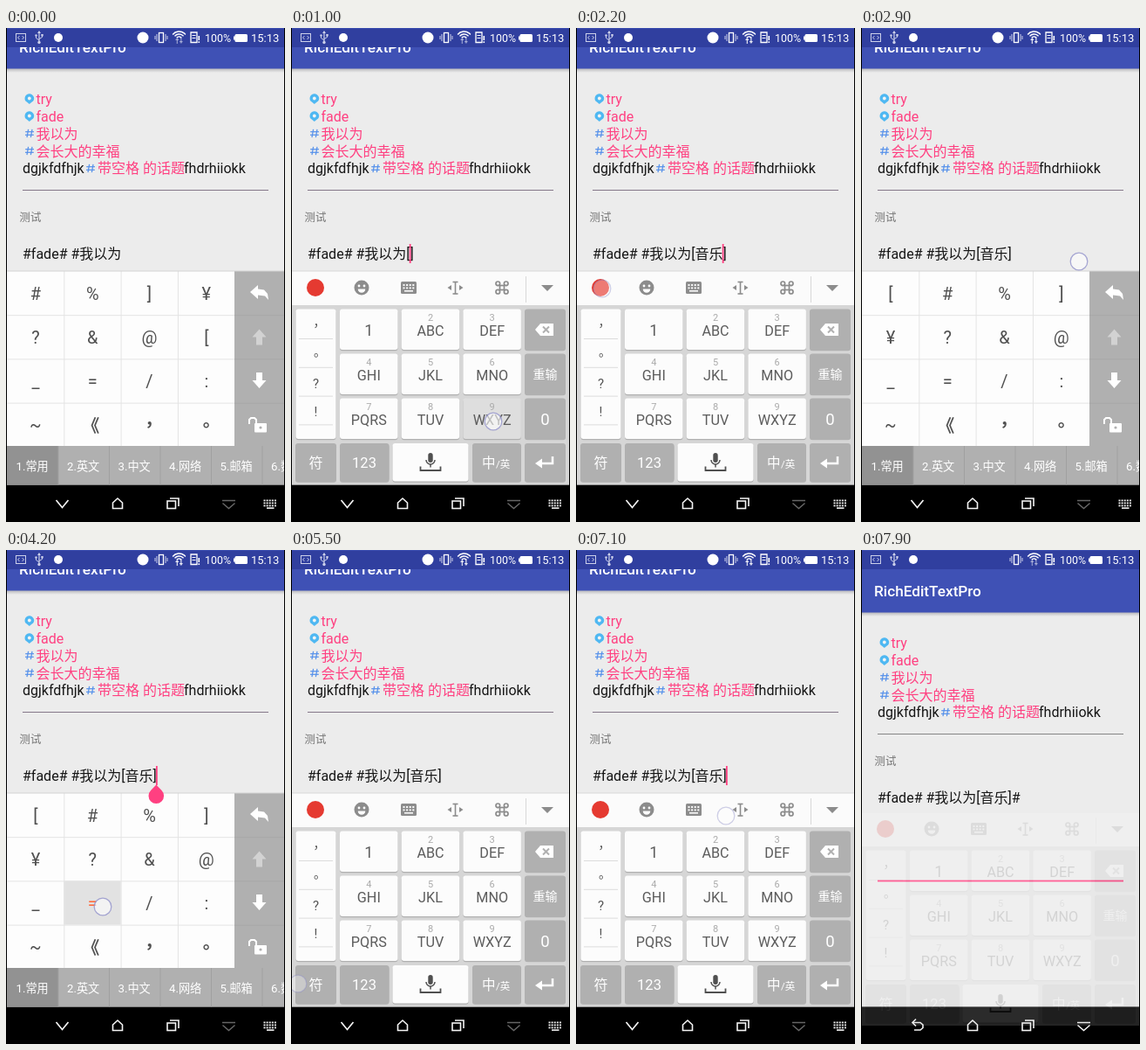
An HTML page with a canvas for the animation above (8000 ms loop, 320 by 565 pixels).

```html
<!DOCTYPE html>
<html lang="zh-CN">
<head>
<meta charset="utf-8">
<title>RichEditTextPro</title>
<style>
html, body { margin: 0; width: 320px; height: 565px; overflow: hidden; background: #000; }
canvas { display: block; width: 320px; height: 565px; }
</style>
</head>
<body>
<canvas id="stage"></canvas>
<script>
const LOOP = 8000, STEP = 100, BASE = 522.4;
const FONT = "Roboto, 'Noto Sans CJK SC', 'Noto Sans CJK', sans-serif";
const PINK = '#ff4081', GREY = '#b0b0b0', DIM = '#8c8c8c';
const canvas = document.getElementById('stage');
const c = canvas.getContext('2d');
const ratio = window.devicePixelRatio || 1;
canvas.width = 320 * ratio;
canvas.height = 565 * ratio;

// Timelines: [start, value]
const BOARD = [[0, 'sym'], [600, 'keys'], [2500, 'sym'], [4300, 'keys'], [5600, 'sym'], [7100, 'keys']];
const ORDER = [[0, '#%]¥?&@[_=/:~《，。'], [600, '[#%]¥?&@_=/:~《，。'], [4300, '=[#%]¥?&@_/:~《，。']];
const HEAD = '#fade# #我以为';
const EDIT = [[0, HEAD + '|'], [700, HEAD + '[|]'], [2200, HEAD + '[音乐|]'], [3000, HEAD + '[音乐]|'],
  [4400, HEAD + '[音乐]=|'], [5100, HEAD + '[音乐]|'], [7200, HEAD + '[音乐]#|']];
const CARET = [[0, 0], [700, 1], [2600, 0], [3000, 1], [3500, 0], [4000, 1], [4800, 0], [5000, 1],
  [5400, 0], [6000, 1], [6500, 0], [7000, 1], [7600, 0]];
const WIFI = [[0, .45], [300, .8], [600, .45], [1300, .8], [6300, .45], [6500, .8], [7200, .45]];
const IDLE = { pin: '', list: ['，', '。', '?', '!'], cand: null };
const INPUT = [[0, IDLE],
  [1100, { pin: 'w', list: ['w', 'x', 'y', 'z'], cand: ['我', '在', '一', '想', '有', '要', '这'] }],
  [1300, { pin: 'xi', list: ['xi', 'yi', 'zi', 'wg'], cand: ['一', '系', '以', '西', '已', '字', '洗'] }],
  [1500, { pin: 'xin', list: ['xin', 'yin', 'xi', 'yi'], cand: ['心', '♥', '新', '信', '因', '银', '音'] }],
  [1700, { pin: 'yin y', list: ['yin', 'xin', 'yi', 'xi'], cand: ['音乐', '信用', '新月', '音域'] }],
  [2200, IDLE]];
// x, y, start, end, pressed key
const TOUCH = [[232, 354, 500, 700, '['], [232, 450, 1000, 1200, 'WXYZ'], [91, 398, 1200, 1400, 'GHI'],
  [231, 399, 1400, 1600, 'MNO'], [236, 453, 1600, 1800, 'WXYZ'], [30, 298, 2100, 2300, ''],
  [28, 497, 2400, 2700, '符'], [250, 267, 2900, 3200, ''], [111, 408, 4200, 4500, '='],
  [291, 345, 5000, 5200, 'del'], [8, 496, 5400, 5700, ''], [172, 304, 7000, 7300, '#']];

const at = (line, t) => line.reduce((v, [s, x]) => t >= s ? x : v, line[0][1]);

function rect(x, y, w, h, fill) { c.fillStyle = fill; c.fillRect(x, y, w, h); }

function round(x, y, w, h, r, fill) {
  c.fillStyle = fill;
  c.beginPath(); c.roundRect(x, y, w, h, r); c.fill();
}

function disc(x, y, r, fill) {
  c.fillStyle = fill;
  c.beginPath(); c.arc(x, y, r, 0, 7); c.fill();
}

// Points as flat x, y pairs
function trace(pts) {
  c.beginPath();
  for (let i = 0; i < pts.length; i += 2) c.lineTo(pts[i], pts[i + 1]);
}

function line(pts, color, w = 1, close) {
  trace(pts);
  if (close) c.closePath();
  c.strokeStyle = color; c.lineWidth = w; c.stroke();
}

function poly(pts, fill) { trace(pts); c.fillStyle = fill; c.fill(); }

function box(x, y, w, h, color, lw = 1) {
  c.strokeStyle = color; c.lineWidth = lw; c.strokeRect(x, y, w, h);
}

function text(s, x, y, size, color, align = 'left', weight = 400) {
  c.font = `${weight} ${size}px ${FONT}`;
  c.textAlign = align; c.fillStyle = color;
  c.fillText(s, x, y);
}

// Centres the ink of a glyph
function ink(s, x, y, size, color, weight) {
  c.font = `${weight} ${size}px ${FONT}`;
  c.textAlign = 'left';
  const m = c.measureText(s);
  text(s, x - (m.actualBoundingBoxRight - m.actualBoundingBoxLeft) / 2,
    y + (m.actualBoundingBoxAscent - m.actualBoundingBoxDescent) / 2, size, color, 'left', weight);
}

function glyph(s, x, y, size, color) {
  if ('，。《'.includes(s)) ink(s, x + (s === '《' ? 3 : 0), y, size, color, 700);
  else text(s, x, y + size * .36, size, color, 'center');
}

function shift(x, y, draw) { c.save(); c.translate(x, y); draw(); c.restore(); }

function pin(x, y) {
  c.fillStyle = '#4fb8f2';
  c.beginPath();
  c.arc(x, y - .5, 5.3, Math.PI * .8, Math.PI * .2);
  c.lineTo(x, y + 6); c.fill();
  disc(x, y - .5, 1.9, '#f4f4f4');
}

function hash(x, y) {
  shift(x, y, () => {
    const b = '#5590ea';
    line([-1.4, -4.7, -3, 4.7], b, 1.2); line([3, -4.7, 1.4, 4.7], b, 1.2);
    line([-4.8, -1.8, 5, -1.8], b, 1.2); line([-5, 1.8, 4.8, 1.8], b, 1.2);
  });
}

function statusBar(t) {
  const w = '#fff', soft = '#ccd0ea';
  rect(1, .7, 318, 21.3, '#303f9f');
  box(11.5, 6.5, 11, 9, soft);
  line([15.5, 9, 13.5, 11, 15.5, 13], soft); line([18.5, 9, 20.5, 11, 18.5, 13], soft);
  line([38, 4, 38, 17], soft, 1.2); poly([36, 6, 38, 3, 40, 6], soft);
  line([38, 14, 34.5, 11.5, 34.5, 8.5], soft); line([38, 12.5, 41.5, 10.5, 41.5, 8], soft);
  disc(38, 16.5, 1.7, soft); disc(34.5, 8.5, 1.2, soft); rect(40.3, 7, 2.4, 2.4, soft);
  disc(60, 11, 5, w);
  if (t < 7600) disc(157, 11, 6.5, w);
  box(175.5, 5.5, 5, 11, w, 1.3);
  line([173, 7, 173, 15], soft); line([183, 7, 183, 15], soft);
  line([171, 9, 171, 13], soft); line([185, 9, 185, 13], soft);
  c.lineWidth = 1.5; c.strokeStyle = w;
  for (const r of [3.5, 6.5, 9.5]) { c.beginPath(); c.arc(198.5, 13.5, r, -2.45, -.69); c.stroke(); }
  c.globalAlpha = at(WIFI, t);
  poly([194, 14, 196.3, 11, 198.6, 14], w); rect(195.7, 13, 1.3, 5, w);
  poly([198.6, 15, 200.9, 18, 203, 15], w); rect(200.2, 11, 1.3, 5, w);
  c.globalAlpha = 1;
  line([212, 5, 219, 5, 219, 16.5, 212, 16.5], w, 1.3, true);
  rect(213.5, 8, 4, 1, w); rect(213.5, 11, 4, 1, w);
  rect(220.5, 9, 1.6, 5, w); rect(220.5, 15.3, 1.6, 1.7, w);
  text('100%', 228, 15.7, 12.4, w);
  round(262.5, 7, 14.5, 9, 1.5, w); rect(261, 9.5, 2, 4, w);
  text('15:13', 281, 16, 13, w);
}

function page(t) {
  const open = t >= 7600, dy = open ? 25 : 0;
  rect(1, 0, 318, BASE, '#ececec');
  shift(0, dy, () => {
    const shade = c.createLinearGradient(0, 46, 0, 51);
    shade.addColorStop(0, '#b4b4b8'); shade.addColorStop(1, '#ececec');
    rect(1, 46, 318, 5, shade);
    rect(1, -25, 318, 71.5, '#3f51b5');
    text('RichEditTextPro', 15, 28, 17.2, '#fff', 'left', 500);
    pin(26.8, 81); pin(26.8, 101); hash(27, 120.5); hash(27, 140.5);
    ['try', 'fade', '我以为', '会长大的幸福'].forEach((s, i) => text(s, 34.4, 86.5 + 20 * i, 16, PINK));
    text('dgjkfdfhjk', 19, 165.5, 16, '#161616');
    hash(97, 160.5);
    text('带空格 的话题', 105, 165.5, 16, PINK);
    text('fhdrhiiokk', 204, 165.5, 16, '#161616');
    rect(19, 185, 282, 1, open ? '#858585' : '#857789');
    text('测试', 15.5, 220.5, 12.4, '#757575');
    if (open) rect(19, 352.6, 282, 1.8, PINK);
    const [a, b] = at(EDIT, t).split('|');
    text(a + b, 19, 264, 16, '#161616');
    if (at(CARET, t)) rect(18.2 + c.measureText(a).width, 247, 1.8, 22, PINK);
  });
}

function symbols(t, down) {
  rect(1, 278, 262, 200, '#fdfdfd');
  rect(262, 278, 57, 200, GREY);
  [...at(ORDER, t)].forEach((s, i) => {
    const x = 1 + (i % 4) * 65.3, y = 278 + (i >> 2) * 50.2, hot = s === down;
    if (hot) rect(x, y, 65.3, 50.2, '#e2e2e2');
    glyph(s, x + 32.9, y + 25.4, 20, hot ? '#ff6a3c' : '#505050');
  });
  for (let i = 1; i < 4; i++) {
    rect(1 + i * 65.3, 278, 1, 200, '#e4e4e4');
    rect(1, 278 + i * 50.2, 261, 1, '#e4e4e4');
    rect(262, 278 + i * 50.2, 57, 1, '#a8a8a8');
  }
  rect(1, 277.5, 318, 1, '#d4d4d4');
  poly([280, 302, 289, 294, 289, 298.5, 296, 299.5, 300, 304, 301, 311, 297, 306.5, 289, 305.5, 289, 310], '#fff');
  const up = [-8, 0, 0, -9, 8, 0, 3.5, 0, 3.5, 9, -3.5, 9, -3.5, 0];
  shift(290.5, 353.5, () => poly(up, '#d2d2d2'));
  shift(290.5, 403, () => { c.scale(1, -1); poly(up, '#fff'); });
  round(285, 452, 14, 10.5, 1, '#fff');
  disc(292, 457, 1.6, GREY);
  line([287, 453, 287, 448, 285, 446, 281, 446, 279, 448, 279, 453], '#fff', 2);
  rect(1, 478, 318, BASE - 478, GREY);
  rect(1, 478, 59, BASE - 478, '#929292');
  ['常用', '英文', '中文', '网络', '邮箱', '数学'].forEach((s, i) => {
    const x = 1 + i * 58.5;
    if (i) rect(x, 478, 1, BASE - 478, '#a0a0a0');
    text(`${i + 1}.${s}`, x + 10.5, 505.5, 13.2, '#fff');
  });
}

function tools() {
  const g = DIM, paper = '#fbfbfb';
  disc(28, 297, 10, '#e53a31');
  disc(81, 297, 8.5, g);
  disc(78, 295, 1.4, paper); disc(84, 295, 1.4, paper);
  c.fillStyle = paper; c.beginPath(); c.arc(81, 298.5, 4.3, 0, Math.PI); c.fill();
  round(126, 290, 18, 14, 1.5, g);
  for (let i = 0; i < 8; i++) rect(128.5 + i % 4 * 3.6, 293 + (i >> 2) * 3.4, 2, 2, paper);
  rect(130, 300, 10, 1.6, paper);
  line([188.5, 291, 188.5, 304], g, 1.6);
  line([185.5, 290.5, 191.5, 290.5], g, 1.6); line([185.5, 304, 191.5, 304], g, 1.6);
  poly([179.5, 297, 184, 294, 184, 300], g); poly([197.5, 297, 193, 294, 193, 300], g);
  c.strokeStyle = g; c.lineWidth = 1.7;
  c.strokeRect(239.5, 294.5, 5, 5);
  for (const [x, y] of [[-1, -1], [1, -1], [1, 1], [-1, 1]]) {
    c.beginPath(); c.arc(242 + x * 4.7, 297 + y * 4.7, 2.3, 0, 7); c.stroke();
  }
  poly([287, 294, 301, 294, 294, 301], g);
}

function heart(x, y) {
  shift(x, y, () => {
    c.fillStyle = '#e8222c';
    c.beginPath(); c.moveTo(0, 9);
    c.bezierCurveTo(-20, -4, -6, -15, 0, -5);
    c.bezierCurveTo(6, -15, 20, -4, 0, 9);
    c.fill();
    disc(-4.5, -4, 1.8, '#f7858a');
  });
}

function candidates(list) {
  c.save();
  c.beginPath(); c.rect(1, 278, 268, 40); c.clip();
  const xs = list[0].length > 1 ? [36, 100, 163, 227] : [26, 71, 110, 148, 185, 223, 261];
  list.forEach((s, i) => {
    if (s === '♥') heart(xs[i], 297.5);
    else text(s, xs[i], 305.5, 20, i ? '#4c4c4c' : '#f4703f', 'center');
  });
  c.restore();
  line([290, 291, 297, 298, 290, 305], '#777', 1.8);
}

function key(x, y, w, h, fill) {
  round(x, y + 1.2, w, h, 3, '#b0b0b0');
  round(x, y, w, h, 3, fill);
}

function keyboard(t, down) {
  const { pin: py, list, cand } = at(INPUT, t);
  rect(1, 278, 318, 40, '#fbfbfb');
  rect(1, 277.5, 318, 1, '#dadada');
  rect(269, 284, 1, 30, '#d8d8d8');
  cand ? candidates(cand) : tools();
  rect(1, 317, 318, BASE - 317, '#d6d6d6');

  key(5.5, 321.5, 46, 148.5, '#fcfcfc');
  list.forEach((s, i) => {
    const y = 340.5 + 32.8 * i;
    if (s === '，' || s === '。') ink(s, 28.5, y + i, 14, '#555', 500);
    else if (/\w/.test(s)) text(s, 28.5, y + 3.5, 11.5, '#555', 'center');
    else text(s, 28.5, y + 5.5, 15, '#555', 'center');
    rect(9, y + 14.5, 39, 1, '#dcdcdc');
  });

  ['1', 'ABC', 'DEF', 'GHI', 'JKL', 'MNO', 'PQRS', 'TUV', 'WXYZ'].forEach((s, i) => {
    const x = 56 + i % 3 * 70.7, y = 321.5 + (i / 3 | 0) * 51;
    key(x, y, 66.5, 46.5, s === down ? '#dedede' : '#fcfcfc');
    text(s, x + 33.3, y + 30, i ? 16.2 : 17.8, '#5c5c5c', 'center');
    if (i) text(i + 1, x + 33.3, y + 13.5, 11, '#aaa', 'center');
  });

  for (let i = 0; i < 3; i++) key(268, 321.5 + i * 51, 47, 46.5, !i && down === 'del' ? '#929292' : GREY);
  poly([280, 345, 286, 338, 301, 338, 301, 352, 286, 352], '#fff');
  line([289, 341.5, 296, 348.5], GREY, 2); line([296, 341.5, 289, 348.5], GREY, 2);
  text('重输', 291.5, 401, 14, '#fff', 'center', 500);
  text('0', 291.5, 453.5, 18.5, '#fff', 'center');

  const y = 475, dark = '#505050';
  key(5, y, 47, 43.5, down === '符' ? '#929292' : GREY);
  key(56, y, 56.5, 43.5, GREY);
  key(116.5, y, 87, 43.5, '#fcfcfc');
  key(208, y, 56, 43.5, GREY);
  key(268, y, 47, 43.5, GREY);
  text('符', 28.5, 503, 16, '#fff', 'center');
  text('123', 84, 503, 16.5, '#fff', 'center');
  text('中', 219, 502.5, 15.5, '#fff');
  text('/英', 235, 502.5, 11.5, '#fff');
  round(157.3, 486, 5.4, 11, 2.7, dark);
  c.strokeStyle = dark; c.lineWidth = 1.5;
  c.beginPath(); c.arc(160, 494, 5, 0, Math.PI); c.stroke();
  line([160, 499, 160, 502.5], dark, 1.5);
  line([148.5, 501.5, 148.5, 506, 171.5, 506, 171.5, 501.5], dark, 1.8);
  line([300, 490, 300, 498, 286, 498], '#fff', 2.5);
  poly([280, 498, 288, 492.5, 288, 503.5], '#fff');

  if (py) {
    c.font = `400 17px ${FONT}`;
    const w = c.measureText(py).width + 11;
    rect(1, 256.5, w, 21.5, 'rgba(248,248,248,.92)');
    box(1.5, 256.5, w, 21.5, '#cfcfcf');
    text(py, 7, 274, 17, '#555');
  }
}

function navBar(t) {
  const w = '#f4f4f4', open = t >= 7600, g = open ? w : '#666';
  if (open) {
    line([59, 540.5, 68, 540.5, 71, 543, 71, 546.5, 68, 549, 61, 549], w, 1.6);
    line([63, 536.5, 59, 540.5, 63, 544.5], w, 1.6);
  } else line([57.5, 540, 64.5, 548.5, 71.5, 540], w, 1.7);
  line([122.5, 543, 128, 538, 133.5, 543, 133.5, 549.5, 122.5, 549.5], w, 1.6, true);
  box(185, 541, 9.5, 8.5, w, 1.6);
  line([188, 538, 198, 538, 198, 547], w, 1.6);
  line([248, 540.5, 263, 540.5], g, 1.5);
  line([248.5, 543.5, 255.5, 549.5, 262.5, 543.5], g, 1.5);
  if (!open) {
    for (let i = 0; i < 15; i++) rect(295.5 + i % 5 * 3.1, 539.5 + (i / 5 | 0) * 3, 2, 1.8, w);
    rect(299, 548.3, 8.5, 1.6, w);
  }
}

function handle() {
  c.fillStyle = PINK;
  c.beginPath();
  c.moveTo(172.3, 268.5);
  c.lineTo(178.6, 275);
  c.arc(172.3, 281.2, 8.8, -.78, Math.PI + .78);
  c.fill();
}

function touch(t) {
  for (const [x, y, a, b] of TOUCH) {
    if (t < a || t >= b) continue;
    c.globalAlpha = t >= a + 100 ? .55 : 1;
    disc(x, y, 9.8, 'rgba(255,255,255,.6)');
    c.strokeStyle = 'rgba(140,140,200,.75)'; c.lineWidth = 1.3;
    c.beginPath(); c.arc(x, y, 9.8, 0, 7); c.stroke();
    c.globalAlpha = 1;
  }
}

// The keyboard leaves as one layer, sinking over the bar below while it fades
const layer = document.createElement('canvas');
layer.width = canvas.width;
layer.height = canvas.height;
const l = layer.getContext('2d');
function fadeKeyboard(t, p) {
  const below = c.getImageData(0, 0, canvas.width, canvas.height);
  keyboard(t, '');
  l.clearRect(0, 0, layer.width, layer.height);
  l.drawImage(canvas, 0, 0);
  c.putImageData(below, 0, 0);
  c.globalAlpha = 1 - .83 * p;
  c.drawImage(layer, 0, 278 * ratio, layer.width, 244 * ratio, 0, 278 + 22 * p * p, 320, 244);
  c.globalAlpha = 1;
}

function draw(t) {
  const hit = TOUCH.find(p => t >= p[2] && t < p[2] + 100);
  const down = hit ? hit[4] : '';
  const leave = Math.max(0, (t - 7500) / 400);
  c.setTransform(ratio, 0, 0, ratio, 0, 0);
  rect(0, 0, 320, 565, '#000');
  c.save();
  c.beginPath(); c.rect(1, 0, 318, 565); c.clip();
  page(t);
  statusBar(t);
  navBar(t);
  if (at(BOARD, t) === 'sym') symbols(t, down);
  else if (leave) fadeKeyboard(t, leave);
  else keyboard(t, down);
  if (t >= 3000 && t < 4300) handle();
  touch(t);
  c.restore();
}

const start = performance.now();
function tick() {
  const t = (performance.now() - start) % LOOP;
  draw(Math.floor(t / STEP) * STEP);
  requestAnimationFrame(tick);
}
tick();
</script>
</body>
</html>
```
